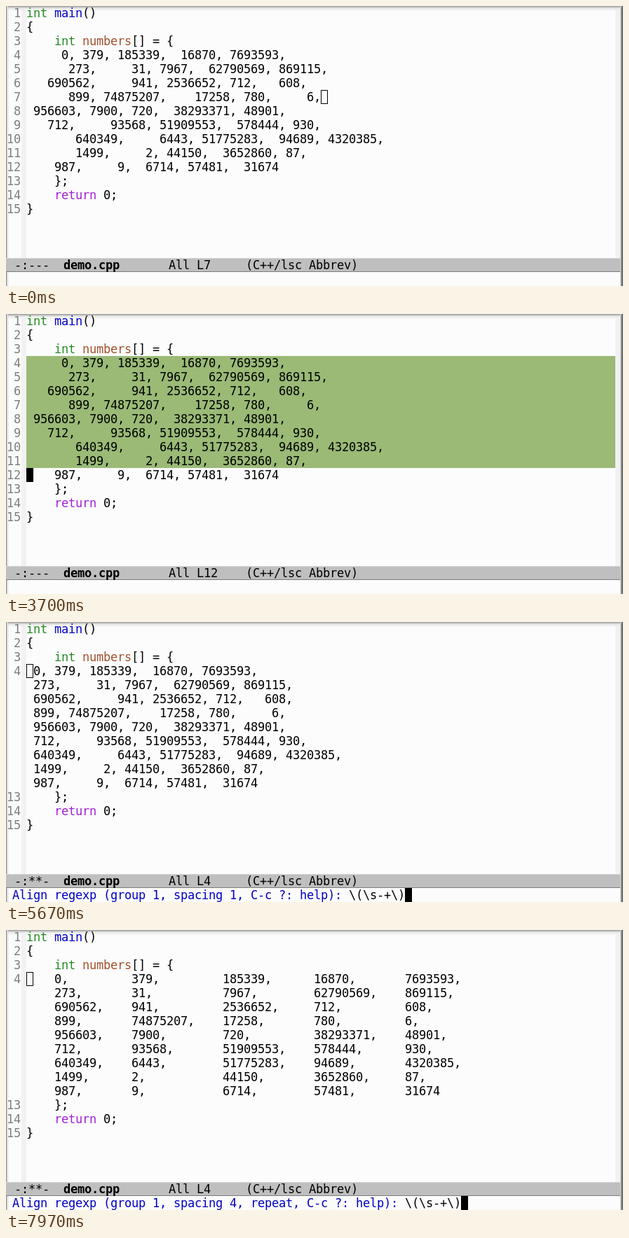
These frames come from a looping animation (880x400 px, 8 s). An HTML page:

```html
<!DOCTYPE html>
<html lang="en">
<head>
<meta charset="utf-8">
<title>Aligning numbers in an editor</title>
<style>
  html, body { margin: 0; width: 880px; height: 400px; overflow: hidden; }
  #stage {
    position: relative; width: 880px; height: 400px; overflow: hidden;
    background: #fcfcfc; color: #000;
    font: 17px/20px "DejaVu Sans Mono", monospace;
    letter-spacing: calc(10px - 1ch);
  }
  #stage > * { position: absolute; margin: 0; font: inherit; white-space: pre; }
  .fringe { top: 0; height: 360px; background: #f2f2f2; }
  #top { left: 0; top: 0; width: 880px; height: 8px;
    background: linear-gradient(#a4a4a4 0 1px, #d0d0d0 2px, #eeeeee 4px, #fcfcfc00); }
  #left { left: 0; top: 0; width: 4px; height: 400px;
    background: linear-gradient(90deg, #8a8a8a 1px, #dadada 1px 2px, #fcfcfc00); }
  #right { left: 876px; top: 0; width: 4px; height: 400px;
    background: linear-gradient(90deg, #d4d4d4 1px, #868686 1px 3px, #606060 3px); }
  #nums { left: 1px; top: 0; color: #7f7f7f; }
  #code { left: 29px; top: 0; }
  #mode { left: 0; top: 360px; width: 876px; height: 20px; text-indent: 2px;
    background: #bfbfbf; box-shadow: inset 0 1px #d4d4d4, inset 0 -1px #7c7c7c; }
  #echo { left: 9px; top: 380px; }
  .region { left: 29px; background: #9aba76; }
  .cursor { width: 10px; height: 20px; box-sizing: border-box; color: #fcfcfc; }
  .solid { background: #000; }
  .hollow { border: 1px solid #000; }
  .type { color: #228b22; }
  .func { color: #0000c8; }
  .var { color: #a0522d; }
  .key { color: #a020d8; }
  .prompt { color: #0000c0; }
  b { font-weight: bold; }
</style>
</head>
<body>
<div id="stage">
  <div class="fringe" style="left:22px;width:7px"></div>
  <div class="fringe" style="left:869px;width:8px"></div>
  <div id="top"></div>
  <div id="left"></div>
  <div id="right"></div>
  <div id="regionBody" class="region" style="top:60px;width:840px;height:160px"></div>
  <div id="regionTail" class="region" style="top:220px;height:20px"></div>
  <pre id="nums"></pre>
  <pre id="code"></pre>
  <pre id="mode"></pre>
  <pre id="echo"></pre>
  <pre id="point" class="cursor"></pre>
  <pre id="caret" class="cursor solid"></pre>
</div>
<script>
const LOOP = 8000, CELL = 10, ROW = 20, CODE_X = 29, ECHO_X = 9;
const FIRST = 4, LAST = 12;
const REGEXP = "\\(\\s-+\\)";

const messy = [
  "     0, 379, 185339,  16870, 7693593,",
  "      273,     31, 7967,  62790569, 869115,",
  "   690562,     941, 2536652, 712,   608,",
  "      899, 74875207,    17258, 780,     6,",
  " 956603, 7900, 720,  38293371, 48901,",
  "   712,     93568, 51909553,  578444, 930,",
  "       640349,     6443, 51775283,  94689, 4320385,",
  "       1499,     2, 44150,  3652860, 87,",
  "    987,     9,  6714, 57481,  31674"
];

// Pads every column to its widest entry, with a gap before each one.
function align(gap) {
  const cells = messy.map(line => line.trim().split(/\s+/));
  const widths = cells[0].map((_, c) => Math.max(...cells.map(row => row[c].length)));
  const space = " ".repeat(gap);
  return cells.map(row => row.map((v, c) => space + v.padEnd(widths[c])).join("").trimEnd());
}

const prompt = (gap, repeat) =>
  `Align regexp (group 1, spacing ${gap}, ${repeat ? "repeat, " : ""}C-c ?: help): `;

const aligned = gap => ({ lines: align(gap), prompt: prompt(gap, true) });

// Each step changes part of the state from its time on.
const steps = [
  [0, { lines: messy, line: 7, col: 42, point: "hollow", region: null,
        prompt: "", input: "", echo: "", preview: false }],
  [170, { point: "solid" }],
  [1570, { line: 4, col: 37 }],
  [2000, { col: 5 }],
  [2270, { col: 0 }],
  [2570, { echo: "Mark set" }],
  [3000, { echo: "" }],
  [3700, { line: LAST, region: 0 }],
  [3930, { col: 36, region: 36 }],
  [4400, { point: "off" }],
  [4570, { point: "hollow", prompt: "M-x " }]
];
const command = "align-regexp";
[[4770, 1], [4870, 2], [4900, 4], [5000, 5], [5070, 7], [5170, 8], [5230, 10], [5300, 12]]
  .forEach(([t, n]) => steps.push([t, { input: command.slice(0, n) }]));
steps.push(
  [5600, { lines: messy.map(s => " " + s.trim()), line: FIRST, col: 0, region: null,
           preview: true, prompt: prompt(1, false), input: REGEXP }],
  [6400, aligned(1)],
  [7000, aligned(2)],
  [7400, aligned(3)],
  [7900, aligned(4)]
);

const el = id => document.getElementById(id);
const span = (cls, text) => `<span class="${cls}">${text}</span>`;
const head = [
  span("type", "int") + " " + span("func", "main") + "()",
  "{",
  "    " + span("type", "int") + " " + span("var", "numbers") + "[] = {"
];
const tail = ["    };", "    " + span("key", "return") + " 0;", "}"];

function render(s) {
  const nums = [];
  for (let n = 1; n <= 15; n++) {
    const hidden = s.preview && n > FIRST && n <= LAST;
    nums.push(hidden ? "" : String(n).padStart(2));
  }
  el("nums").textContent = nums.join("\n");
  el("code").innerHTML = [...head, ...s.lines, ...tail].join("\n");

  el("mode").innerHTML = ` -:${s.preview ? "**" : "--"}-  <b>demo.cpp</b>       ` +
    `All L${s.line}`.padEnd(11) + "(C++/lsc Abbrev)";
  el("echo").innerHTML = span("prompt", s.prompt) + s.input + s.echo;

  const selected = s.region !== null;
  el("regionBody").hidden = el("regionTail").hidden = !selected;
  el("regionTail").style.width = (s.region || 0) * CELL + "px";

  const point = el("point");
  point.hidden = s.point === "off";
  point.className = "cursor " + s.point;
  point.style.left = CODE_X + s.col * CELL + "px";
  point.style.top = (s.line - 1) * ROW + "px";
  point.textContent = s.point === "solid" ? s.lines[s.line - FIRST][s.col] || "" : "";

  const caret = el("caret");
  caret.hidden = !s.prompt;
  caret.style.left = ECHO_X + (s.prompt + s.input).length * CELL + "px";
  caret.style.top = "380px";
}

let shown = -1;
function tick() {
  const t = performance.now() % LOOP;
  const count = steps.filter(([at]) => at <= t).length;
  if (count !== shown) {
    shown = count;
    render(Object.assign({}, ...steps.slice(0, count).map(step => step[1])));
  }
  requestAnimationFrame(tick);
}
tick();
</script>
</body>
</html>
```
